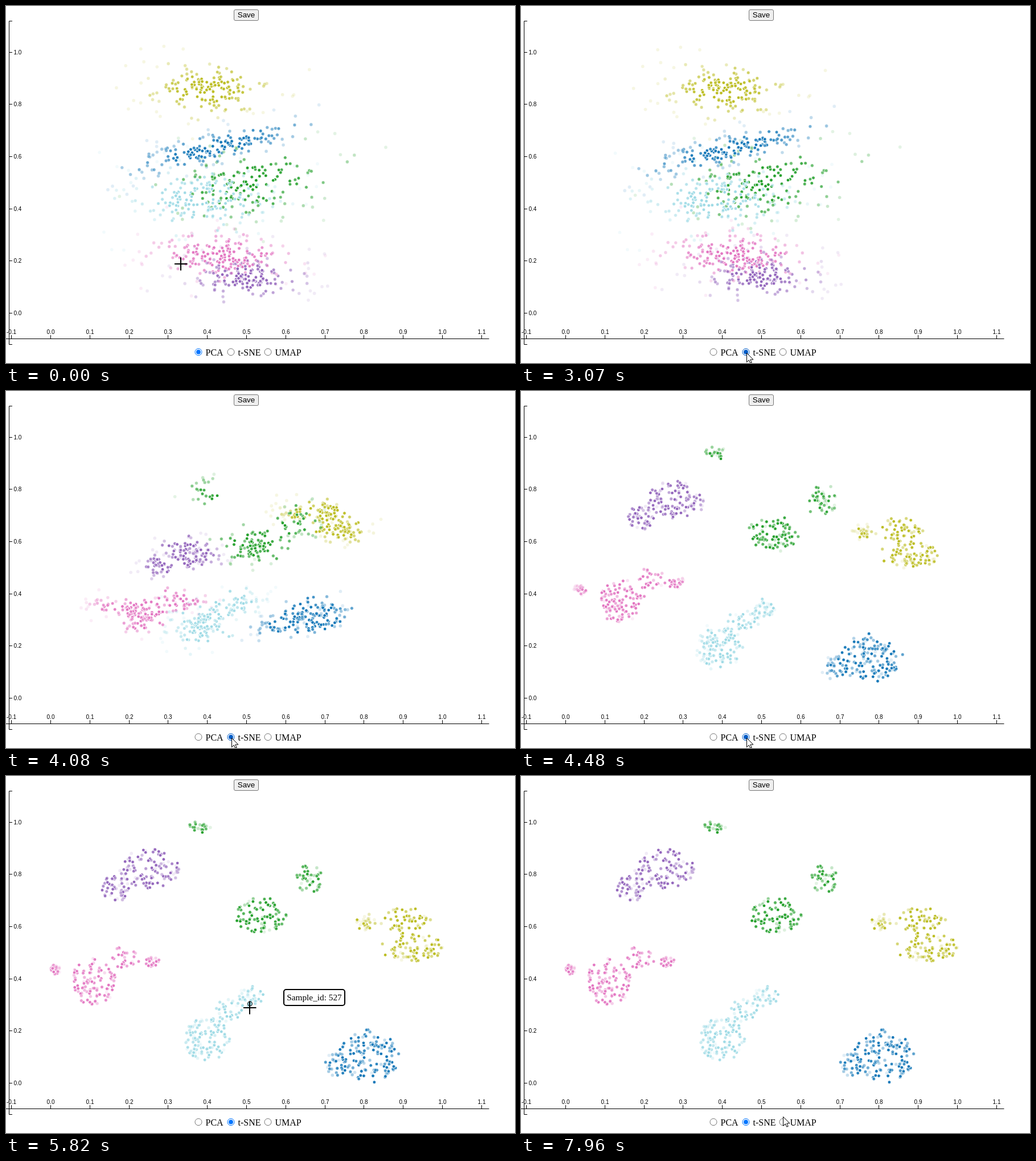
An HTML page with a canvas for the animation above (8000 ms loop, 894x627 px).

```html
<!DOCTYPE html>
<html lang="en">
<head>
<meta charset="utf-8">
<title>Projection scatter</title>
<style>
  html, body { margin: 0; width: 100%; height: 100%; overflow: hidden; background: #fff; }
  #stage { position: relative; width: 894px; height: 627px; overflow: hidden; }
  #stage > * { position: absolute; left: 0; top: 0; }
  .axis text { font: 10px "Liberation Sans", Arial, sans-serif; }
  .axis path { fill: none; stroke: #000; }
  .save { font: 13.333px "Liberation Sans", Arial, sans-serif; }
  .label { font: 16px "Liberation Serif", "Times New Roman", serif; }
  #tip {
    box-sizing: border-box; width: 109px; height: 30px;
    border: 2px solid #000; border-radius: 5px; background: #fff; text-align: center;
    font: 15.3px/26px "Liberation Serif", "Times New Roman", serif; white-space: nowrap;
  }
</style>
</head>
<body>
<div id="stage">
  <canvas id="plot" width="894" height="627"></canvas>
  <svg width="894" height="627">
    <g class="axis" id="axis"></g>
    <rect x="400.5" y="6.5" width="43" height="19" rx="2.5" fill="#efefef" stroke="#767676"/>
    <text class="save" x="422" y="20" text-anchor="middle">Save</text>
    <g id="radios"></g>
  </svg>
  <div id="tip"></div>
  <svg width="894" height="627">
    <g id="cursor">
      <path id="cross" d="M-11 0H11.5M0 -11.5V11.5" stroke="#000" stroke-width="2"/>
      <path id="arrow" d="M.5 .5V16.5L4.3 12.9L6.8 18.3L9.2 17.2L6.8 12H12Z" fill="#fff" stroke="#000"/>
    </g>
  </svg>
</div>
<script>
const $ = id => document.getElementById(id);
const LOOP = 8000, FIRST = 1490, STEP = 137.66;
const CLICK = 2550, MOVE_START = 2840, MOVE_TIME = 2345;

// Axes
let axis = '<path d="M11 26.5H5.5V594.5H11M0 584.5H848.5"/>';
for (let i = -1; i <= 11; i++) {
  const x = Math.round(78 + 68.8 * i) + .5;
  axis += `<path d="M${x} 584V578"/><text x="${x}" y="576" text-anchor="middle">${(i / 10).toFixed(1)}</text>`;
}
for (let i = 0; i <= 5; i++) {
  const y = Math.floor(539.5 - 91.7 * i) + .5;
  axis += `<path d="M6 ${y}H11"/><text x="13.5" y="${y + 3.5}">${(i / 5).toFixed(1)}</text>`;
}
$('axis').innerHTML = axis;

// Radio buttons
$('radios').innerHTML = [['PCA', 338], ['t-SNE', 395], ['UMAP', 460]].map(([name, x]) =>
  `<circle cx="${x}" cy="607.7" r="6" fill="#fff"/><circle cx="${x}" cy="607.7" r="3.9"/>
   <text class="label" x="${x + 12.5}" y="614">${name}</text>`).join('');
const rings = [...$('radios').querySelectorAll('circle')];

function setRadios(chosen, tint) {
  for (let i = 0; i < 3; i++) {
    rings[2 * i].setAttribute('stroke', i === chosen ? tint : '#767676');
    rings[2 * i + 1].setAttribute('fill', i === chosen ? tint : 'none');
  }
}

// Points: each has a place in both projections
let seed = 20;
function rnd() {
  seed = (seed + 0x6D2B79F5) | 0;
  let t = Math.imul(seed ^ (seed >>> 15), 1 | seed);
  t = (t + Math.imul(t ^ (t >>> 7), 61 | t)) ^ t;
  return ((t ^ (t >>> 14)) >>> 0) / 4294967296;
}
const bell = () => 2 * (rnd() + rnd() + rnd() - 1.5);
const clamp = (v, low, high) => Math.min(high, Math.max(low, v));
const points = [];

// Islands are ellipses, left to right, filled in proportion to their area
function pick(islands, q) {
  let rest = q * islands.reduce((sum, e) => sum + e.rx * e.ry, 0);
  return islands.find(e => (rest -= e.rx * e.ry) <= 0) || islands[islands.length - 1];
}
const island = (x, y, rx, ry = rx) => ({ x, y, rx, ry });

// A dense, opaque core in a pale halo; points keep their rough order across the islands
function group(color, n, cloud, slope, ...islands) {
  const spots = Array.from({ length: n }, (_, i) => {
    const size = i % 2 ? .55 : 1.05;
    return { u: bell() * size, v: bell() * size };
  }).sort((a, b) => a.u - b.u);
  spots.forEach(({ u, v }, i) => {
    const e = pick(islands, clamp(i / n + .25 * bell(), 0, 1));
    const r = Math.sqrt(rnd()), a = rnd() * 2 * Math.PI;
    points.push({
      color,
      x0: cloud.x + u * cloud.rx,
      y0: cloud.y + v * cloud.ry + u * cloud.rx * slope,
      x1: e.x + r * Math.cos(a) * e.rx,
      y1: e.y + r * Math.sin(a) * e.ry,
      alpha: clamp(1.25 - .55 * Math.hypot(u, v) + .3 * (rnd() - .5), .13, 1),
      z: rnd()
    });
  });
}

const PINK = '#e377c2', CYAN = '#9edae5';
group('#bcbd22', 165, island(355, 146, 66, 29), 0,
  island(632, 257, 18, 15), island(702, 254, 45, 23), island(712, 301, 56, 26));
group('#1277b8', 165, island(368, 248, 95, 17), -.25,
  island(580, 506, 20, 21), island(637, 492, 53, 47));
group(CYAN, 185, island(345, 338, 82, 38), 0,
  island(352, 462, 41, 38), island(393, 411, 26, 21), island(430, 387, 22, 18));
group('#24a02c', 150, island(430, 312, 98, 40), -.12,
  island(340, 90, 20, 10), island(448, 246, 46, 33), island(534, 180, 27, 24));
group('#9467bd', 150, island(420, 476, 62, 27), 0,
  island(192, 198, 24, 24), island(250, 163, 54, 35));
group(PINK, 180, island(385, 438, 84, 27), .04,
  island(87, 340, 9), island(153, 361, 41), island(208, 318, 28, 19), island(257, 327, 13, 9));
points.sort((a, b) => a.z - b.z);

const ctx = $('plot').getContext('2d');
function dot(x, y, r, fill, line) {
  ctx.beginPath();
  ctx.arc(x, y, r, 0, 7);
  ctx.fillStyle = fill;
  ctx.fill();
  ctx.strokeStyle = line;
  ctx.stroke();
}

const cubic = p => p < .5 ? 4 * p ** 3 : 1 - 4 * (1 - p) ** 3;
const mix = (a, b, k) => a + (b - a) * k;

function drawPoints(t) {
  const k = cubic(clamp((t - MOVE_START) / MOVE_TIME, 0, 1));
  ctx.clearRect(0, 0, 894, 627);
  for (const p of points) {
    ctx.globalAlpha = p.alpha;
    dot(mix(p.x0, p.x1, k), mix(p.y0, p.y1, k), 2.9, p.color, '#fff');
  }
  ctx.globalAlpha = 1;
}

// Pointer stops: time, x, y. It jumps between the early ones and glides later.
const stops = [
  [0, 307, 453], [250, 330, 476], [560, 331, 461], [680, 337, 465],
  [1490, 344, 470], [1903, 388, 578], [2454, 396, 609], [4794, 396, 609],
  [5069, 414, 596], [5895, 428, 407], [6721, 369, 473], [6859, 378, 491], [7960, 460, 598]
];
function pointer(t) {
  const next = stops.findIndex(s => s[0] > t);
  const i = next < 0 ? stops.length - 1 : next - 1;
  const [a, x, y] = stops[i];
  if (t < FIRST || next < 0) return [x, y];
  const [b, u, v] = stops[next];
  const k = (t - a) / (b - a);
  return [mix(x, u, k), mix(y, v, k)];
}

// Hovered samples: from, to, id
const hovers = [[560, 1490, 412], [1490, 1600, 436], [5890, 6000, 527], [6700, 6830, 550], [6830, 6970, 563]];

function drawTip(t) {
  const hover = hovers.find(h => t >= h[0] && t < h[1]);
  $('tip').style.display = hover ? '' : 'none';
  if (!hover) return;
  const [x, y] = pointer(t < FIRST ? hover[0] : t);
  $('tip').style.transform = `translate(${Math.round(x + 59)}px, ${Math.round(y - 33)}px)`;
  $('tip').textContent = 'Sample_id: ' + hover[2];
  dot(x + .5, y - 7, 4, t < CLICK ? PINK : CYAN, '#000');
}

function render(t) {
  drawPoints(t);
  drawTip(t);
  const [x, y] = pointer(t);
  const low = y > 590;
  $('cursor').setAttribute('transform', `translate(${x} ${y})`);
  $('cross').style.display = low ? 'none' : '';
  $('arrow').style.display = low ? '' : 'none';
  const chosen = t < CLICK ? 0 : 1;
  setRadios(chosen, chosen && low && x < 447 ? '#005cc8' : '#0075ff');
}

// The picture advances in even steps once the pointer starts to glide
const snap = t => t < FIRST ? t : FIRST + STEP * Math.floor((t - FIRST) / STEP + .6);

const begin = performance.now();
let shown = -1;
function tick() {
  const t = snap((performance.now() - begin) % LOOP);
  if (t !== shown) render(shown = t);
  requestAnimationFrame(tick);
}
tick();
</script>
</body>
</html>
```
